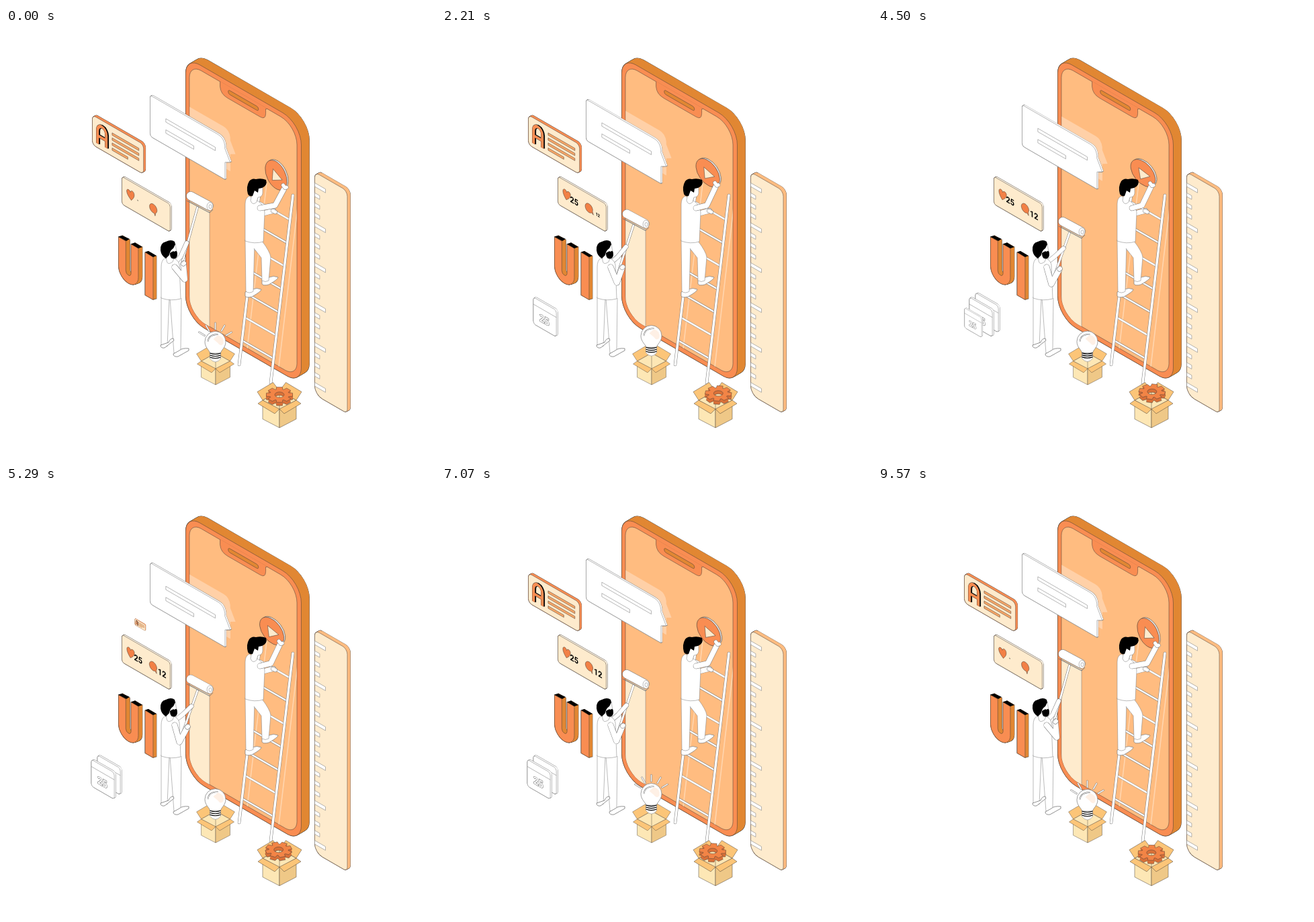
An HTML page with a canvas that plays this animation: 640x640 px, repeating every 9640 ms.

```html
<!DOCTYPE html>
<html lang="en">
<head>
<meta charset="utf-8">
<title>Building an app</title>
<style>
html, body { margin: 0; width: 100%; height: 100%; overflow: hidden; background: #fff; }
canvas { display: block; }
</style>
</head>
<body>
<canvas id="stage" width="640" height="640"></canvas>
<script>
const ctx = document.getElementById('stage').getContext('2d');
const LOOP = 9640, TAU = Math.PI * 2;
const INK = '#4a4038', GRAY = '#777', WHITE = '#fff', BLACK = '#000';
const ORANGE = '#f98d52', DARK = '#e18733', PEACH = '#ffbc80', CREAM = '#feebcd';
const BOX = ['#fcc578', '#fde7b5', '#efc887'];

// Timing helpers
const KEYS = [0, 1290, 3140, 4500, 6000, 7070, 9570];
const lerp = (a, b, p) => a + (b - a) * p;
const unit = (t, a, b) => Math.min(1, Math.max(0, (t - a) / (b - a)));
const ramp = (t, a, b) => { const p = unit(t, a, b); return p * p * (3 - 2 * p); };
const slope = (v, i) => i === 0 || i === KEYS.length - 1 ? 0
  : (v[i + 1] - v[i - 1]) / (KEYS[i + 1] - KEYS[i - 1]);

// Smooth curve through one value per key time
function track(t, v) {
  if (t >= KEYS[6]) return v[6];
  let i = 0;
  while (t >= KEYS[i + 1]) i++;
  const d = KEYS[i + 1] - KEYS[i], p = (t - KEYS[i]) / d, q = 1 - p;
  return v[i] * q * q * (1 + 2 * p) + slope(v, i) * d * p * q * q
    + v[i + 1] * p * p * (3 - 2 * p) - slope(v, i + 1) * d * p * p * q;
}

// Drawing helpers
function at(x, y, draw) {
  ctx.save();
  ctx.translate(x, y);
  draw();
  ctx.restore();
}
const iso = (x, y, draw) => at(x, y, () => { ctx.transform(.866, .5, 0, 1, 0, 0); draw(); });
const shape = d => d instanceof Path2D ? d : new Path2D(d);

function paint(d, fill, ink = INK, width = .5) {
  const p = shape(d);
  if (fill) { ctx.fillStyle = fill; ctx.fill(p, 'evenodd'); }
  if (ink) { ctx.strokeStyle = ink; ctx.lineWidth = width; ctx.stroke(p); }
}
function rounded(x, y, w, h, r = 0) {
  const p = new Path2D();
  p.roundRect(x, y, w, h, r);
  return p;
}
function circle(x, y, rx, ry = rx) {
  const p = new Path2D();
  p.ellipse(x, y, rx, ry, 0, 0, TAU);
  return p;
}
// Isometric plate whose back is shifted by dx, dy
function slab(x, y, d, dx, dy, front, side, ink = INK) {
  const p = shape(d), n = Math.ceil(Math.hypot(dx, dy));
  for (const pass of [0, 1])
    for (let i = n; i >= 0; i--)
      iso(x + dx * i / n, y + dy * i / n, () =>
        pass ? paint(p, side, null) : paint(p, null, ink, .9));
  iso(x, y, () => paint(p, front, ink));
}
function limb(points, width, ink = GRAY) {
  const p = new Path2D();
  points.forEach(([x, y], i) => i ? p.lineTo(x, y) : p.moveTo(x, y));
  ctx.lineCap = ctx.lineJoin = 'round';
  paint(p, null, ink, width);
  paint(p, null, WHITE, width - 1);
  ctx.lineCap = 'butt';
  ctx.lineJoin = 'miter';
}
function label(text, font, x, y, fill, ink) {
  ctx.font = `bold ${font}, sans-serif`;
  if (ink) { ctx.strokeStyle = ink; ctx.lineWidth = 1.2; ctx.strokeText(text, x, y); }
  ctx.fillStyle = fill;
  ctx.fillText(text, x, y);
}
function scaleAbout(x, y, s, draw) {
  if (s > .01) at(x, y, () => { ctx.scale(s, s); ctx.translate(-x, -y); draw(); });
}

const PHONE = [267.5, 42.8];
const SCREEN = rounded(6.35, 7.5, 184.8, 373.5, [20, 28]);
const BUBBLE = new Path2D('M4 1H117Q127 1 128.500 12V16L137.500 32 128.700 36.500V62H4Q0 62 0 57V5Q0 1 4 1Z');

function onScreen(draw) {
  ctx.save();
  const clip = new Path2D();
  clip.addPath(SCREEN, new DOMMatrix([.866, .5, 0, 1, ...PHONE]));
  ctx.clip(clip);
  draw();
  ctx.restore();
}

function phone() {
  slab(...PHONE, rounded(0, 0, 198.6, 388, [24, 32]), 12, -7, ORANGE, DARK);
  iso(...PHONE, () => {
    const notch = 'M59 7.500V15Q60 25.500 72 25.500H128Q137 25.500 137.500 16V9L140 7.500';
    paint(SCREEN, PEACH);
    paint(notch + 'V7H59Z', ORANGE, null);
    paint(notch, null);
    paint(rounded(73, 12.5, 52, 6, 3), DARK);
  });
}

const RAILS = [[[347, 501], [378, 238]], [[394, 528], [427, 249]]];

function ladder() {
  for (let i = 0; i < 7; i++) {
    const y = 465 - 34.4 * i, x = 347 + (501 - y) * .118;
    limb([[x, y], [x + 47, y + 27]], 3.4);
  }
  RAILS.forEach(rail => limb(rail, 4.4));
}
function ladderShadow() {
  at(10, -7, () => RAILS.forEach(([a, b]) =>
    paint(`M${a}L${b}`, null, 'rgba(255,240,220,.5)', 1.6)));
}

function ruler() {
  slab(459.5, 214.5, rounded(0, 0, 56, 331, [8, 8, 6, 13]), 4.5, -2.4, CREAM, PEACH);
  iso(459.5, 214.5, () => {
    for (let i = 0; i <= 20; i++)
      paint(rounded(0, 16 + i * 14.85, i % 4 ? 8.5 : 18.5, 5.5), WHITE, GRAY);
  });
}

function roller(p) {
  const y = 38 * p;
  onScreen(() => paint(`M273 ${y + 258}L303 ${y + 273}V480H273Z`, CREAM, GRAY));
  limb([[285, 267 + y], [262, lerp(350, 370, p)]], 3.6);
  at(0, y, () => {
    paint('M269 257L303 275 308 270', null, GRAY, 1);
    limb([[275, 250], [302, 264.5]], 13.5);
    paint(circle(303.5, 265.5, 4.4, 6), WHITE, GRAY);
    paint(circle(304, 265.8, 2, 3), null, GRAY);
  });
}

function painter(p) {
  const mix = (a, b) => [lerp(a[0], b[0], p), lerp(a[1], b[1], p)];
  const farHand = mix([269, 320], [276, 328]), hand = mix([264, 351], [270, 359]);
  limb([[254, 347], mix([260, 340], [262, 341]), farHand], 7);
  paint('M231 400V472L240 474 243 402M244 402L250 484Q255 485 260 480L261 402', WHITE, GRAY);
  paint('M230 472L242 468Q244 462 249 462L250 465 236 476Q230 477 230 472Z', WHITE, GRAY, .8);
  paint('M249 485L258 480Q262 476 272 477V480L256 489Q249 490 249 485Z', WHITE, GRAY, .8);
  paint('M236 343Q231 346 231 356V402Q245 407 260 403L258 352Q256 345 250 343Z', WHITE, GRAY);
  paint('M238 341L243 330 252 321 254 334 248 348Q240 354 239 346Z', WHITE, GRAY);
  paint('M251 318Q246 314 238 318Q229 320 230 331Q231 339 238 343L243 338Q244 331 249 328L252 322Z', BLACK, null);
  paint('M244 335Q249 331 251 333Q255 329 255 338Q254 345 247 343Q244 341 244 335Z', BLACK, null);
  limb([[251, 356], mix([266, 374], [258, 381]), hand], 9);
  limb([hand, [hand[0] + 1, hand[1] - 1]], 7);
}

function disc(x, y, turn) {
  const layer = (dx, fill) => at(x + dx, y - dx / 2, () => {
    ctx.rotate(turn * Math.PI / 180);
    ctx.transform(.866, .5, 0, 1, 0, 0);
    paint(circle(0, 0, 19.5), fill, INK, .6);
    if (!dx) paint('M-6 -6V11L11 1Z', CREAM);
  });
  layer(2, '#eee');
  layer(0, ORANGE);
}

function climber(hand) {
  const shoe = 'M356 393L367 389Q373 386 380 389Q380 392 366 400Q358 402 356 399Z';
  paint(shoe, WHITE, GRAY, .7);
  at(25, -18, () => paint(shoe, WHITE, GRAY, .7));
  paint('M356 315L357 392Q362 396 368 392L370 320', WHITE, GRAY);
  paint('M365 317H381Q393 333 394 341L391 376Q386 379 381 376L380 342 369 328', WHITE, GRAY);
  limb([[379, 277], [398, 272]], 8);
  limb([[397, 272], [401, 274]], 6);
  paint('M362 250Q356 253 356 262V317Q370 322 383 318L385 275Q384 262 374 257Z', WHITE, GRAY);
  paint('M367 240L382 237V246Q381 252 375 252L373 259Q367 265 364 257Z', WHITE, GRAY);
  paint('M360 247Q357 236 362 228Q366 223 372 225Q380 223 387 226Q390 234 381 238L376 239 375 245 370 242 367 250Q362 251 360 247Z', BLACK, null);
  const elbow = [hand[0] - 15, 264];
  limb([[378, 268], elbow, [hand[0] - 2, hand[1] + 2]], 8.5);
  limb([[hand[0] - 3, hand[1] - 4], hand, [hand[0] + 2, hand[1] - 1]], 6);
}

function speech(y) {
  slab(214.5, 99 + y, BUBBLE, 1.8, -1, WHITE, WHITE, GRAY);
  iso(214.5, 99 + y, () => {
    paint(rounded(27, 22.5, 85, 5), WHITE, GRAY);
    paint(rounded(27, 39, 48, 5), WHITE, GRAY);
  });
}

function letterCard() {
  slab(128.5, 129.5, rounded(0, 0, 88, 44, 6), 3, -1.7, CREAM, ORANGE);
  iso(128.5, 129.5, () => {
    [9.5, 17, 24.5, 32].forEach((y, i) => paint(rounded(34, y, i < 3 ? 46 : 27, 3.5), '#fba766'));
    const letter = 'M9 38V18a7.500 8.500 0 0 1 15 0V37M9 26H24';
    for (const dx of [2, 1]) at(dx, -dx / 2, () => paint(letter, null, BLACK, 4.8));
    paint(letter, null, INK, 5);
    paint(letter, null, ORANGE, 4.2);
  });
}

function likes(t) {
  slab(172.5, 221, rounded(0, 0, 83, 41, 4), 1.8, -1, CREAM, '#fff6e6');
  const icon = (x, y, turn, d) => iso(x, y, () => {
    ctx.rotate(turn * Math.PI / 180);
    paint(d, '#f28046');
  });
  icon(185.5, 247.5, track(t, [-8, 6, 0, 4, 0, 2, -8]),
    'M0 8.500C-5 4-6.500 1-6.500-2C-6.500-6.500-1-7 0-3C1-7 6.500-6.500 6.500-2C6.500 1 5 4 0 8.500Z');
  icon(218.5, 269, track(t, [18, -20, 0, 0, 0, 4, 18]),
    'M4 4.500A6.500 6.500 0 1 1 6 2.500L6.500 7Z');
  const count = (text, x, y, s) => scaleAbout(x + 5.5, y - 2, s, () =>
    iso(x, y, () => label(text, '12.5px Roboto', 0, 0, BLACK)));
  const gone = ramp(t, 8800, 9520);
  count('25', 190.5, 258.5, Math.max(.15, ramp(t, 100, 1100) * (1 - gone)));
  count('12', 226, 279.5, ramp(t, 1700, 2700) * (1 - gone));
}

function blockLetters() {
  const cap = d => paint(d, BLACK, null);
  slab(167.5, 311, 'M0 0V43.500a17 17 0 0 0 34 0V0H21.500V43.500a4.500 5 0 0 1-9 0V0Z', 6, -2, ORANGE, DARK);
  slab(207, 334, 'M0 0H13.800V63.500H0Z', 5, -1.5, ORANGE, DARK);
  cap('M167 310.500L179 317 184 314 173 309Z');
  cap('M186 321.500L197 328 203 326 192 319.500Z');
  cap('M207 333.500L219 341 224 339 212 332Z');
}

function calendars(t) {
  const STEP = 1710, FIRST = 1174, MOVE = 400;
  for (let k = 4; k >= 0; k--) {
    const start = FIRST + k * STEP, end = start + 2 * STEP;
    const place = ramp(t, start, start + MOVE) + ramp(t, start + STEP, start + STEP + MOVE);
    const grow = ramp(t, start - 910, start - 410);
    const shrink = k < 3 ? unit(t, end - 450, end + 250) : unit(t, 8850, 9520);
    const x = 145 - 9 * place, y = 394 + 6.5 * place;
    scaleAbout(x + 7, y + 37, grow * (1 - shrink * shrink), () => {
      slab(x, y, rounded(0, 0, 39.5, 39.5, 4), 2, -1, WHITE, WHITE, GRAY);
      iso(x, y, () => {
        paint('M0 10.500H39.500', null, GRAY);
        label('25', '15px "Open Sans"', 10.5, 30, WHITE, GRAY);
      });
    });
  }
}

function crate(x, y, s, content) {
  const scaled = draw => at(x, y, () => { ctx.scale(s, s); draw(); });
  const both = draw => [1, -1].forEach(side => { ctx.save(); ctx.scale(side, 1); draw(side); ctx.restore(); });
  scaled(() => {
    paint('M-25-41L0-55 25-41 0-27Z', BOX[1]);
    both(() => paint('M-25-41L0-55-9.500-67.500-33-53.500Z', BOX[0]));
    paint('M0-55V-27', null);
  });
  content();
  scaled(() => {
    both(side => paint('M-25-40L0-27V0L-25-13Z', BOX[side > 0 ? 1 : 2]));
    both(() => paint('M-25-41L0-28-7-21-32-36Z', BOX[0]));
  });
}

function bulb(t) {
  const y = -9 * Math.sin(Math.PI * t / (LOOP / 2)) ** 2;
  const glow = 1 - ramp(t, 700, 2100) + ramp(t, 6000, 7000);
  at(311.5, 467 + y, () => {
    if (glow > .02)
      for (let i = -2; i <= 2; i++) {
        ctx.save();
        ctx.rotate(i * .52);
        limb([[0, -18.5], [0, -18.5 - 9.5 * glow]], 1 + 1.4 * glow);
        ctx.restore();
      }
    paint('M-8 15V25Q-4 30 0 30Q5 30 8 25V15Z', WHITE, GRAY);
    paint('M-8 17C-8 13-15.500 9-15.500 0A15.500 15.500 0 0 1 15.500 0C15.500 9 8 13 8 17Z', WHITE, GRAY, .7);
    paint('M4-10Q14-7 12 3Q8 8 4 2L-3-4Z', 'rgba(253,218,190,.4)', null);
    paint('M-11 0Q-10-11 4-11', null, GRAY, 1.8);
    paint('M-11 0Q-10-11 4-11', null, WHITE, .9);
    for (const v of [17, 20, 23]) paint(`M-8 ${v}Q0 ${v + 3} 8 ${v}`, null, BLACK, 1.1);
  });
}

function gear(t) {
  const a = TAU * t / LOOP, path = new Path2D();
  for (let i = 0; i < 8; i++)
    for (const [r, d] of [[14.5, -.34], [20, -.22], [20, .22], [14.5, .34]]) {
      const b = i * TAU / 8 + d;
      path.lineTo(r * Math.cos(b), r * Math.sin(b));
    }
  path.closePath();
  path.moveTo(7, 0);
  path.arc(0, 0, 7, 0, TAU);
  for (let h = 5; h >= 0; h--)
    at(407 + 4.3 * Math.sin(a), 544 + 2.3 * Math.cos(a) + h - .5, () => {
      ctx.scale(1, .58);
      ctx.rotate(-a);
      paint(path, h ? '#d97038' : '#f28446', h % 5 ? null : INK, .6);
    });
}

function draw(t) {
  ctx.fillStyle = WHITE;
  ctx.fillRect(0, 0, 640, 640);
  const half = 1 - Math.abs(1 - t / (LOOP / 2));
  const float = 14.5 * (half < .5 ? 2 * half * half : 1 - 2 * (1 - half) ** 2);
  const stroke = track(t, [0, .41, .94, 1, .95, .79, 0]);
  const dx = track(t, [402, 394.5, 397.5, 394.5, 397, 397, 402]);
  const dy = track(t, [219, 216.5, 215, 216, 216, 217, 219]);

  phone();
  onScreen(() => {
    iso(222.5, 87 + float, () => paint(BUBBLE, 'rgba(255,255,255,.3)', null));
    ladderShadow();
  });
  roller(stroke);
  ruler();
  ladder();
  disc(dx, dy, track(t, [4, -9, 0, -9, -4, -5, 4]));
  climber([dx + 13.5, dy + 19]);
  speech(float);
  scaleAbout(208, 215, 1 - ramp(t, 3000, 4000) + ramp(t, 5000, 6000), letterCard);
  likes(t);
  blockLetters();
  calendars(t);
  painter(stroke);
  crate(312, 531, .86, () => bulb(t));
  crate(407, 595, 1, () => gear(t));
}

function tick() {
  draw(performance.now() % LOOP);
  requestAnimationFrame(tick);
}
tick();
</script>
</body>
</html>
```
